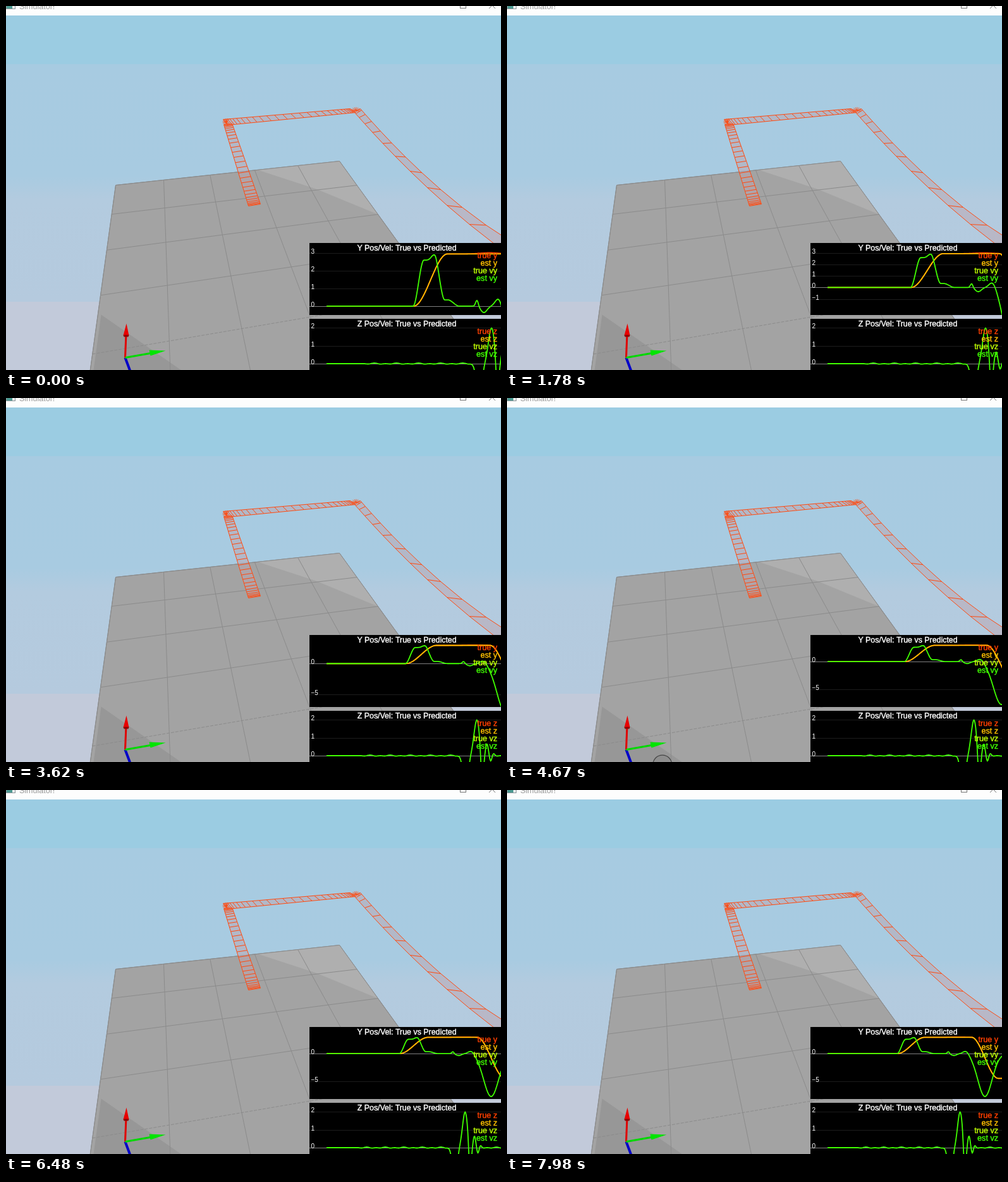
Recreate the animation shown at these times as an HTML page with a canvas. Size 783x576 px, loop 8000 ms.

```html
<!DOCTYPE html>
<html lang="en">
<head>
<meta charset="utf-8">
<title>Simulator</title>
<style>
html, body { margin: 0; width: 783px; height: 576px; overflow: hidden; background: #c2cada; }
canvas { display: block; }
</style>
</head>
<body>
<canvas id="stage" width="783" height="576"></canvas>
<script>
const ctx = document.getElementById('stage').getContext('2d');
const LOOP = 8000, STEP = 135.25;
const FONT = '"Liberation Sans", Arial, sans-serif';
const RED = '#ff4000', ORANGE = '#ffbf00', LIME = '#bfff00', GREEN = '#40ff00', TRAIL = '#ff4a10';

// Signals over u, the sample's distance from the plot's left end
const bell = (u, center, width, height) => height * Math.exp(-(((u - center) / width) ** 2));
const rise = (u, from, to) => {
  const k = Math.min(Math.max((u - from) / (to - from), 0), 1);
  return k * k * (3 - 2 * k);
};
const posY = u => 2.95 * rise(u, 138, 191) - 7.45 * rise(u, 284, 336);
const trueY = u => posY(u) + bell(u, 258, 22, .07);
const velY = u => 2.6 * rise(u, 137, 154) - 2.25 * rise(u, 171, 187) - .35 * rise(u, 192, 210)
  + bell(u, 170, 6, .3) + bell(u, 238, 3, .35) + bell(u, 249, 7, -.36)
  + bell(u, 273, 8, .6) + bell(u, 310, 20, -7.8);
const velZ = u => bell(u, 241.5, 6, -1.8) + bell(u, 261, 6.8, 2) + bell(u, 270.3, 3.2, -1.7)
  + bell(u, 278.5, 3.5, .65) + bell(u, 285, 3, -.35) + bell(u, 290, 3, .12)
  + (u > 60 ? .035 * Math.sin(u * .27) * Math.sin(u * .09 + 1) : 0);

function poly(points, fill, stroke, width = 1, open) {
  ctx.beginPath();
  points.forEach(([x, y]) => ctx.lineTo(x, y));
  if (!open) ctx.closePath();
  if (fill) { ctx.fillStyle = fill; ctx.fill(); }
  if (stroke) { ctx.strokeStyle = stroke; ctx.lineWidth = width; ctx.stroke(); }
}
const line = (a, b, color, width) => poly([a, b], null, color, width, true);
function rect(x, y, w, h, color) { ctx.fillStyle = color; ctx.fillRect(x, y, w, h); }
function label(s, x, y, color, size, align = 'left', weight = 0) {
  ctx.font = size + 'px ' + FONT;
  ctx.textAlign = align;
  ctx.fillStyle = ctx.strokeStyle = color;
  ctx.fillText(s, x, y);
  ctx.lineWidth = weight;
  if (weight) ctx.strokeText(s, x, y);
}

function sky() {
  rect(0, 0, 783, 15, '#fdfdfd');
  rect(0, 15, 783, 77, '#9bcce2');
  const g = ctx.createLinearGradient(0, 92, 0, 468);
  [[0, '#a7cbe1'], [.47, '#a8cbe1'], [.57, '#b3cbdf'], [1, '#b5cade']].forEach(s => g.addColorStop(...s));
  rect(0, 92, 783, 376, g);
  rect(0, 468, 783, 108, '#c2cada');
  rect(0, -4, 15, 9, '#8a9499');
  rect(1, -4, 9, 8, '#4c9a92');
  rect(10, -4, 4, 8, '#eee');
  label('Simulator!', 21, 4.5, '#999', 12.5);
  ctx.strokeStyle = '#777';
  ctx.lineWidth = 1;
  ctx.strokeRect(718.5, -5.5, 9, 9);
  line([764, 4], [773, -5], '#777');
  line([774, 4], [765, -5], '#777');
}

// Floor cell corner in perspective: i to the right, j towards the viewer
function floor(i, j) {
  const d = 1 + .0187 * i - .094 * j;
  return [(173 + 80.66 * i - 22 * j) / d, (283 - 3.02 * i + 15.1 * j) / d];
}
function ground() {
  poly([floor(0, 0), floor(5, 0), floor(5, 5), floor(0, 5)], '#a3a3a3', '#888');
  poly([[398, 259], floor(5, 0), floor(5, 2), [490, 289]], '#afafaf');
  poly([[150, 488], [277, 576], [138, 576]], '#979797');
  for (let k = 0; k <= 5; k++) {
    line(floor(k, 0), floor(k, 5), '#8b8b8b');
    ctx.setLineDash(k === 4 ? [5, 2] : []);
    line(floor(0, k), floor(5, k), '#8b8b8b');
    ctx.setLineDash([]);
  }
}

const mix = (a, b, k) => a.map((v, i) => v + (b[i] - v) * k);
// Strip from row a to row b, each row being [left x, y, right x, y], bent by an optional row c
function strip(a, b, count, ease, c = mix(a, b, .5)) {
  const rows = Array.from({ length: count + 1 }, (_, i) => {
    const k = ease(i / count);
    return mix(mix(a, c, k), mix(c, b, k), k);
  });
  const left = rows.map(r => r.slice(0, 2)), right = rows.map(r => r.slice(2));
  poly([...left, ...right.slice().reverse()], 'rgba(190,165,175,.5)');
  rows.forEach((r, i) => line(left[i], right[i], TRAIL));
  poly(left, null, TRAIL, 1, true);
  poly(right, null, TRAIL, 1, true);
}
function fan(x, y, r, from, to, n) {
  for (let i = 0; i <= n; i++) {
    const a = from + (to - from) * i / n;
    line([x, y], [x + r * Math.cos(a), y + r * .8 * Math.sin(a)], TRAIL, .8);
  }
}
function trail() {
  const crowdEnds = k => k - .12 * Math.sin(2 * Math.PI * k);
  strip([383, 316, 402, 313], [344, 187, 357, 185], 27, crowdEnds);
  strip([343, 179, 350, 188], [544, 162, 553, 168], 27, crowdEnds);
  strip([551, 168, 560, 162], [772, 376, 801, 374], 11, k => k * k, [658, 290, 680, 300]);
  fan(349, 183, 7, 1.5, 5.2, 9);
  fan(553, 165, 7, 2.6, 6.5, 9);
}

function axes() {
  line([188, 556], [197, 580], '#0000c8', 4);
  line([188, 556], [189.5, 518], '#e00000', 3);
  poly([[190, 502], [194, 521], [185, 521]], '#e80000');
  poly([[185, 520], [194, 520], [193, 523], [186, 523]], '#8c0000');
  line([188, 556], [228, 549], '#00d800', 3);
  poly([[252, 545], [226, 544], [228, 553]], '#00e400');
}

// A propeller briefly shows above the bottom edge while drifting left
function rotor(t) {
  const x = 231 - 200 * (t - 4.67), top = 564 + 12 * ((t - 4.75) / .7) ** 2;
  if (top > 576) return;
  ctx.beginPath();
  ctx.arc(x, top + 15, 15, 0, 7);
  ctx.fillStyle = '#8e8e8e';
  ctx.fill();
  ctx.strokeStyle = '#444';
  ctx.lineWidth = 1.2;
  ctx.stroke();
}

function plot(name, top, toY, ticks, series, scale) {
  ctx.save();
  ctx.beginPath();
  ctx.rect(480, top, 303, 114);
  ctx.clip();
  rect(480, top, 303, 114, '#000');
  ticks.forEach(v => {
    const y = Math.round(toY(v));
    rect(480, y, 303, 1, v ? '#1c1c1c' : '#808080');
    label(String(v).replace('-', '−'), 482.5, y + 1, '#fff', 10);
  });
  series.forEach(([f, color]) => {
    const points = [];
    for (let u = 0; u <= 277 * scale; u++) points.push([507 + u / scale, toY(f(u))]);
    poly(points, null, color, 1.8, true);
  });
  label(name.toUpperCase() + ' Pos/Vel: True vs Predicted', 634, top + 12, '#fff', 12.4, 'center', .4);
  [['true ', RED], ['est ', ORANGE], ['true v', LIME], ['est v', GREEN]].forEach(([s, color], i) =>
    label(s + name, 777, top + 23.5 + 12 * i, color, 12.6, 'right', .4));
  ctx.restore();
}

function plots(t) {
  // The time axis squeezes as samples arrive; the Y axis widens to its lowest value
  const scale = 1 + .0235 * t + .0009 * t * t;
  let low = 0;
  for (let u = 230; u <= 275.5 * scale; u += .5) low = Math.min(low, velY(u));
  const range = 3 - low, gap = range < 6 ? 1 : range < 9 ? 2 : 5;
  const ticks = [];
  for (let v = -5 * gap; v <= 3; v += gap) if (v > low + .25) ticks.push(v);
  plot('y', 375, v => 391 + (3 - v) * 94 / range, ticks,
    [[trueY, RED], [posY, ORANGE], [velY, GREEN]], scale);
  plot('z', 495, v => 566 - v * 28.5, [0, 1, 2], [[velZ, GREEN]], scale);
}

function draw(now) {
  const t = Math.floor(now % LOOP / STEP + .45) * STEP / 1000;
  sky();
  ctx.save();
  ctx.translate(.5, .5);
  ground();
  trail();
  axes();
  rotor(t);
  ctx.restore();
  plots(t);
  requestAnimationFrame(draw);
}
draw(performance.now());
</script>
</body>
</html>
```
